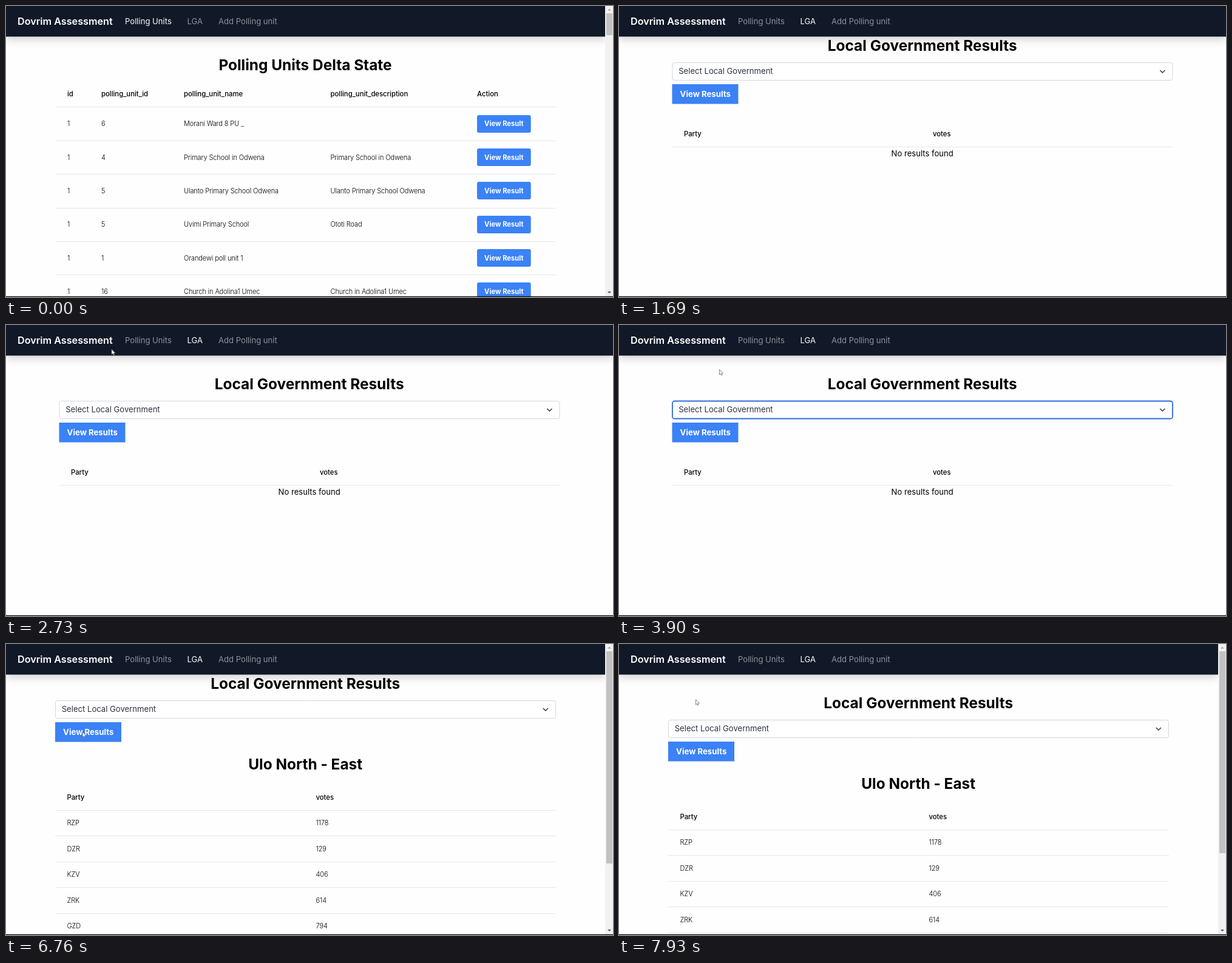
An HTML page with a canvas that plays this animation: 1000 by 480 pixels, repeating every 8 s.

```html
<!DOCTYPE html>
<html lang="en">
<head>
<meta charset="utf-8">
<title>Polling results</title>
<style>
  html, body { margin: 0; width: 100%; height: 100%; overflow: hidden; background: #fefefe; }
  canvas { display: block; width: 1000px; height: 480px; }
</style>
</head>
<body>
<canvas id="stage"></canvas>
<script>
const W = 1000, H = 480, LOOP = 8000, TICK = 130, BAR_X = 987;
const BLUE = '#3b82f6', INK = '#111827', LINE = '#e5e7eb';
const canvas = document.getElementById('stage');
const ctx = canvas.getContext('2d');
const ratio = window.devicePixelRatio || 1;
canvas.width = W * ratio;
canvas.height = H * ratio;

const units = [
  ['6', 'Morani Ward 8 PU _', ''],
  ['4', 'Primary School in Odwena', 'Primary School in Odwena'],
  ['5', 'Ulanto Primary School Odwena', 'Ulanto Primary School Odwena'],
  ['5', 'Uvimi Primary School', 'Ototi Road'],
  ['1', 'Orandewi poll unit 1', ''],
  ['16', 'Church in Adolina1 Umec', 'Church in Adolina1 Umec']
];
const votes = [['RZP', '1178'], ['DZR', '129'], ['KZV', '406'], ['ZRK', '614'], ['GZD', '794']];
const region = 'Ulo North - East';

// Pointer tracks: [time, x, y], visible from first to last time
const tracks = [
  [[260, 820, 330], [780, 420, 90], [1040, 420, 90], [1170, 311, 30], [1690, 311, 30]],
  [[2080, 311, 30], [2730, 174, 40], [2990, 174, 40], [3640, 166, 135], [3770, 166, 135],
   [3900, 165.5, 73.5], [5980, 165.5, 73.5]],
  [[6110, 160, 110], [6370, 126, 145], [7020, 126, 145], [7150, 126.5, 91.5], [LOOP, 126.5, 91.5]]
];

function text(str, x, mid, size, weight, color, align = 'left', spacing = 0) {
  ctx.font = `${weight} ${size}px Inter, sans-serif`;
  ctx.letterSpacing = spacing + 'px';
  ctx.textAlign = align;
  ctx.fillStyle = color;
  ctx.fillText(str, x, mid + size * 0.36);
}
const title = (str, x, mid) => text(str, x, mid, 24.4, 700, '#000', 'center');
const head = (str, x, mid) => text(str, x, mid, 11.3, 500, '#000');
const cell = (str, x, mid) => text(str, x, mid, 11, 300, '#000', 'left', -0.12);

function rect(x, y, w, h, color) {
  ctx.fillStyle = color;
  ctx.fillRect(x, y, w, h);
}

function round(x, y, w, h, r) {
  ctx.beginPath();
  ctx.roundRect(x, y, w, h, r);
}

function poly(points, color) {
  ctx.beginPath();
  points.forEach(([x, y]) => ctx.lineTo(x, y));
  ctx.closePath();
  ctx.fillStyle = color;
  ctx.fill();
}

function nav(width, active) {
  ctx.save();
  ctx.shadowColor = 'rgba(0,0,0,.16)';
  ctx.shadowBlur = 13 * ratio;
  ctx.shadowOffsetY = 5 * ratio;
  rect(0, 0, width, 50.5, INK);
  ctx.restore();
  text('Dovrim Assessment', 19, 25, 16.2, 600, '#fff');
  [['Polling Units', 196], ['LGA', 298.5], ['Add Polling unit', 350]].forEach(([label, x], i) =>
    text(label, x, 25, 13.1, 400, i === active ? '#fff' : '#8f9298'));
}

function scrollbar(end) {
  rect(BAR_X, 0, W - BAR_X, H, '#f1f1f1');
  rect(989, 12, 10, end - 12, '#c1c1c1');
  poly([[991, 7.5], [994, 4.5], [997, 7.5]], '#a3a3a3');
  poly([[991, 471], [994, 474], [997, 471]], '#505050');
}

function unitsPage() {
  title('Polling Units Delta State', 493, 97);
  ['id', 'polling_unit_id', 'polling_unit_name', 'polling_unit_description', 'Action']
    .forEach((label, i) => head(label, [101, 157, 293, 534.5, 776][i], 145.3));
  rect(81, 166, 825, 1, LINE);
  units.forEach(([id, name, note], i) => {
    const mid = 194.3 + i * 55.35;
    cell('1', 101, mid);
    cell(id, 157, mid);
    cell(name, 293, mid);
    cell(note, 534.5, mid);
    round(776, Math.round(mid - 14.6), 88.7, 29, 3.2);
    ctx.fillStyle = BLUE;
    ctx.fill();
    text('View Result', 820.3, mid, 11.2, 700, '#fff', 'center');
    rect(81, Math.round(mid + 27.5), 825, 1, LINE);
  });
}

function resultsPage(x, top, { focus, choice, loaded }) {
  const mid = x + 412.2;
  title('Local Government Results', mid, top + 97);

  round(x + 0.5, top + 125.5, 824, 29, 3.5);
  ctx.fillStyle = '#fff';
  ctx.fill();
  ctx.strokeStyle = focus ? '#2f6ad9' : '#d3d6db';
  ctx.lineWidth = focus ? 1.8 : 1;
  ctx.stroke();
  text(choice, x + 10.7, top + 139.5, 13.1, 400, '#2b3340');
  ctx.beginPath();
  ctx.moveTo(x + 803.8, top + 138);
  ctx.lineTo(x + 807.9, top + 142);
  ctx.lineTo(x + 812, top + 138);
  ctx.strokeStyle = '#343a40';
  ctx.lineWidth = 1.5;
  ctx.stroke();

  rect(x, top + 161, 109, 32.5, BLUE);
  text('View Results', x + 54.7, top + 177.5, 13.2, 700, '#fff', 'center');

  if (loaded) title(region, mid, top + 230);
  const y = top + (loaded ? 285 : 243);
  head('Party', x + 19.5, y);
  head('votes', x + 429.5, y);
  rect(x, Math.round(y + 21), 825, 1, LINE);
  if (!loaded) {
    text('No results found', mid, y + 32, 13.1, 400, '#000', 'center');
    return;
  }
  votes.forEach(([party, count], i) => {
    const row = y + 42.5 + i * 42.45;
    cell(party, x + 19.5, row);
    cell(count, x + 429.5, row);
    rect(x, Math.round(row + 20.8), 825, 1, LINE);
  });
}

function pointer(t) {
  for (const track of tracks) {
    const i = track.findIndex(p => t < p[0]);
    if (i < 1) continue;
    const [a, b] = [track[i - 1], track[i]];
    const k = (t - a[0]) / (b[0] - a[0]);
    ctx.save();
    ctx.translate(a[1] + (b[1] - a[1]) * k, a[2] + (b[2] - a[2]) * k);
    poly([[0, 0], [0, 8.6], [2, 6.9], [3.3, 9.7], [4.6, 9.1], [3.4, 6.4], [6, 6.2]], '#fff');
    ctx.strokeStyle = '#555';
    ctx.lineWidth = 0.7;
    ctx.stroke();
    ctx.restore();
    return;
  }
}

function draw(time) {
  const t = Math.floor(time / TICK) * TICK;
  const loaded = t >= 6500;
  const onUnits = t < 1690;
  const bar = onUnits || loaded;

  ctx.setTransform(ratio, 0, 0, ratio, 0, 0);
  rect(0, 0, W, H, '#fefefe');
  if (onUnits) {
    unitsPage();
  } else {
    const raised = t < 2080 || (loaded && t < 7930);
    resultsPage(loaded ? 81 : 87.5, raised ? -32 : 0, {
      focus: t >= 3380 && !loaded,
      choice: t >= 6110 && !loaded ? region : 'Select Local Government',
      loaded
    });
  }
  nav(bar ? BAR_X : W, onUnits ? 0 : 1);
  if (bar) scrollbar(onUnits ? 48 : t < 7930 ? 362 : 345);
  pointer(t);
  rect(0, 478.8, W, 1.2, '#0a0a0a');
}

function tick() {
  draw(performance.now() % LOOP);
  requestAnimationFrame(tick);
}
tick();
</script>
</body>
</html>
```
